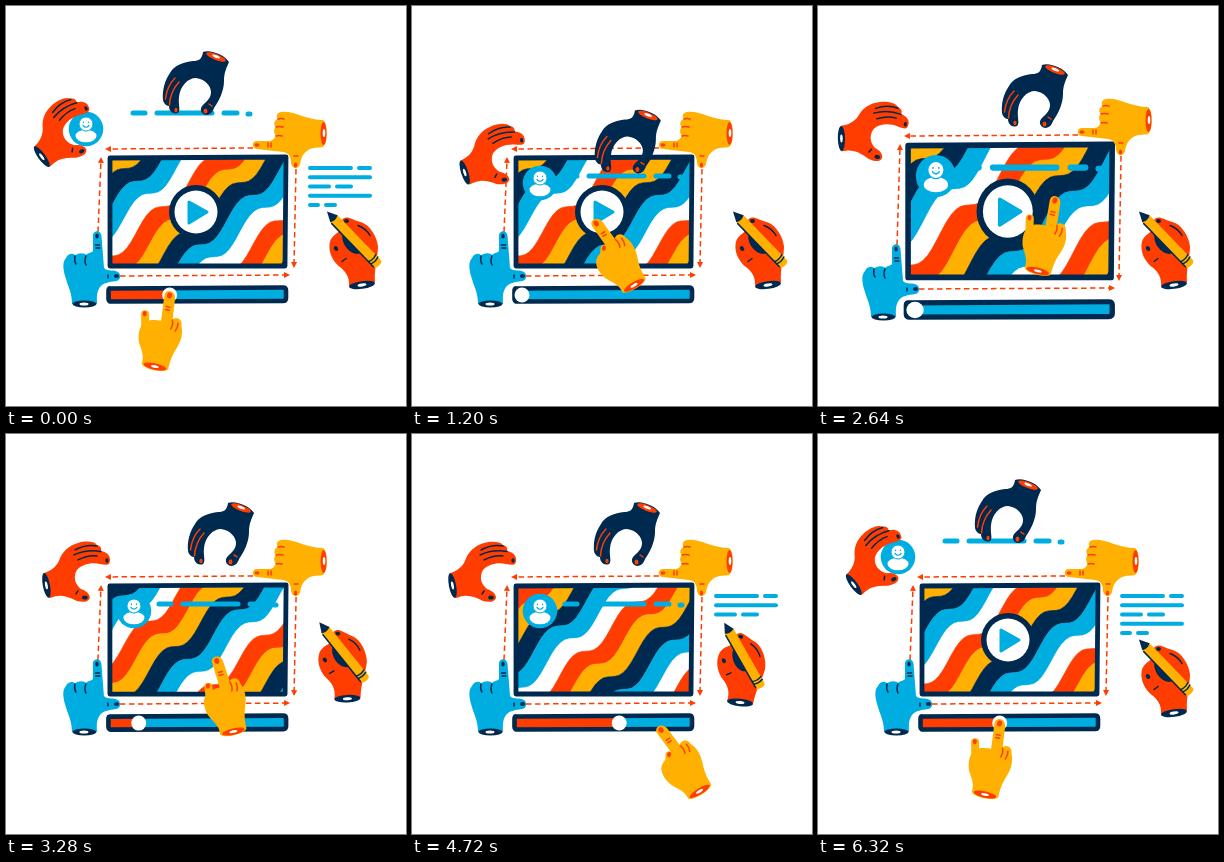
An HTML page for the animation above (6.4 s loop, 400x400 px).

```html
<!DOCTYPE html>
<html lang="en">
<head>
<meta charset="utf-8">
<title>Video player hands</title>
<style>
  html, body { margin: 0; width: 100%; height: 100%; overflow: hidden; background: #fff; }
  svg { display: block; width: 100vw; height: 100vh; }
  .n { fill: #00294f; } .r { fill: #ff3d00; } .y { fill: #ffb000; } .b { fill: #00ade0; } .w { fill: #fff; }
  .ln, .lr, .lb, .ly { fill: none; stroke-width: 1.5; stroke-linecap: round; stroke-linejoin: round; }
  .ln { stroke: #00294f; } .lr { stroke: #ff3d00; } .lb { stroke: #00ade0; } .ly { stroke: #ffb000; }
  .dash { fill: none; stroke: #ff3d00; stroke-width: 1.5; stroke-dasharray: 5.5 3.5; }
</style>
</head>
<body>
<svg viewBox="0 0 400 400" xmlns="http://www.w3.org/2000/svg">
  <defs>
    <clipPath id="inside"><path d="M105 152 L279 151 L278 260 L104 260 Z"/></clipPath>
    <marker id="head" markerUnits="userSpaceOnUse" markerWidth="8" markerHeight="8" refX="4" refY="4" orient="auto">
      <path class="r" d="M1 1 L7 4 L1 7 Z"/>
    </marker>
  </defs>
  <rect class="w" width="400" height="400"/>

  <g id="arrows"></g>

  <g id="screen">
    <g clip-path="url(#inside)"><g id="stripes"></g></g>
    <path class="ln" style="stroke-width:4.8" d="M104 152 L280 151 L279 260 L104 260 Z"/>
    <g id="play">
      <circle class="n" cx="190" cy="206" r="27"/>
      <circle class="w" cx="190" cy="206" r="21.5"/>
      <path class="b" stroke="#00ade0" stroke-width="3" stroke-linejoin="round" d="M183 196 L201 206 L183 217 Z"/>
    </g>
    <path id="title" class="lb" style="stroke-width:5" d="M153 170 H165 M177 170 H232 M244 170 H257 M268 171 H270"/>
    <g id="avatar">
      <circle class="b" cx="128" cy="177" r="17.3"/>
      <ellipse class="w" cx="128" cy="184" rx="10.5" ry="6.3"/>
      <circle class="w" cx="128" cy="172" r="7" stroke="#00ade0"/>
      <path class="lb" style="stroke-width:1.2" d="M125.500 170 v.6 M130.500 170 v.6 M125 173.500 Q128 177 131 173.500"/>
    </g>
  </g>

  <g id="seek">
    <rect class="b" x="102" y="281" width="178" height="15" rx="3"/>
    <rect id="fill" class="r" x="103" y="282" height="13.5"/>
    <path class="ln" style="stroke-width:4.6" d="M104 282.500 Q102.500 282 102.500 285 V293 Q102.500 296 106 295.500 L277 295 Q280 295 280 292 V284.500 Q280 281.500 277 281.500 Z"/>
    <circle id="knob" class="w" cy="289" r="7.5"/>
  </g>

  <g id="text" class="lb" style="stroke-width:4"></g>

  <g id="blueHand">
    <path class="b" d="M66 298 C66 286 62 281 60 273 C57 264 56 256 60 252 C62 247 68 247 69 249.500 C73 246 79 247 80 249 C83 246 86 247 87 245 L87 231 C86 224 95 223 95.500 230 L98 262 C102 266 108 263 112 266 C116 269 114 275 110 275 C103 276 97 277 94 281 C90 287 91 292 91 298 Z"/>
    <ellipse class="n" cx="78.500" cy="298" rx="12" ry="3.500"/>
    <ellipse class="w" cx="78" cy="298" rx="4.500" ry="1.500"/>
    <ellipse class="n" cx="91" cy="230" rx="1.700" ry="2.600"/>
    <ellipse class="n" cx="110.500" cy="270" rx="2.500" ry="1.900"/>
    <path class="ln" d="M69 250 Q68 255 70 258 M80 250 Q78 255 80 259 M89.500 239 h4 M90 242 h4 M102 269 v3"/>
  </g>

  <g id="cornerHand">
    <path class="y" d="M317 114 C309 114 303 112 296 110 C288 107 281 105 275 106 C270 107 270 111 272 113 C268 114 267 119 270 121 C267 123 268 128 270 130 C268 133 266 135 263 135 L251 135 C245 135 246 143 251 143 L277 146 C283 147 285 151 285 157 C286 164 293 163 294 158 C295 151 298 146 304 143 C309 141 313 142 317 141 C322 138 322 117 317 114 Z"/>
    <ellipse class="r" cx="317.500" cy="127.500" rx="3" ry="11.500"/>
    <ellipse class="w" cx="318" cy="127" rx="1.300" ry="4"/>
    <ellipse class="r" cx="251" cy="139" rx="2.500" ry="1.700"/>
    <ellipse class="r" cx="289.500" cy="159" rx="1.700" ry="2.500"/>
    <path class="lr" d="M272 113 Q275 112 278 113 M270 121 Q273 120 277 121 M270 130 Q273 129 276 130 M262 137 v4 M265 137 v4 M288 150 h4"/>
  </g>

  <g id="redHand">
    <path class="r" d="M38 139 C45 137 50 133 53 127 C56 118 62 112 72 109 C79 107 88 107 91 111 C95 112 96 115 95 117 C101 118 105 122 104 127 C104 132 99 131 94 130 C86 128 76 130 71 136 C67 143 69 150 75 155 C81 157 84 160 84 164 C82 169 76 168 71 167 C65 164 58 161 52 162 C48 162 46 164 43 164 Z"/>
    <g transform="rotate(-11 40.500 151.500)">
      <ellipse class="n" cx="40.500" cy="151.500" rx="3.600" ry="12.500"/>
      <ellipse class="w" cx="40.500" cy="151.500" rx="1.300" ry="4"/>
    </g>
    <path class="ln" d="M69 116 Q80 110 91 112 M68 121 Q81 115 95 117.500 M72 126 Q82 121 91 122 M70 160 l2 -3"/>
    <ellipse class="n" cx="79" cy="163.500" rx="2.800" ry="2"/>
    <ellipse class="n" cx="101" cy="126.500" rx="1.600" ry="2.300"/>
  </g>

  <g id="navyHand">
    <path class="n" d="M222 69 C221 76 218 78 212 78 C203 79 193 82 189 90 C184 97 181 107 182 117 C183 122 187 123 188 123 C188 128 192 132 197 130 C200 127 197 122 198 114 C199 103 207 95 215 95 C224 96 230 103 230 109 C230 115 226 118 222 122 C218 126 220 131 225 132 C230 132 232 128 233 125 C238 118 243 108 243 98 C243 90 245 86 248 79 C244 72 229 66 222 69 Z"/>
    <g transform="rotate(21 235 74)">
      <ellipse class="r" cx="235" cy="74" rx="10.500" ry="3"/>
      <ellipse class="w" cx="235" cy="73.500" rx="4" ry="1.300"/>
    </g>
    <path class="lr" d="M184.500 116 Q186 103 194 95 M188.500 122 Q189 109 198 99 M228 121 l3 2"/>
    <ellipse class="r" cx="224.500" cy="128" rx="2" ry="2.600"/>
    <ellipse class="r" cx="195" cy="127" rx="1.600" ry="2.300"/>
  </g>

  <g id="pencilHand">
    <path class="r" d="M343 280 C344 270 339 264 332 259 C325 252 322 243 324 235 C326 229 331 227 334 224 C333 216 336 210 342 211 C348 213 352 215 356 216 C364 219 371 230 372 240 C372 250 368 262 369 276 Z"/>
    <path class="n" d="M337 226 C345 223 356 231 358 242 C355 250 347 248 342 243 C337 238 335 231 337 226 Z"/>
    <g transform="rotate(-8 356 278.500)">
      <ellipse class="n" cx="356" cy="278.500" rx="13" ry="3.800"/>
      <ellipse class="w" cx="356" cy="278.500" rx="4.500" ry="1.500"/>
    </g>
    <g transform="translate(321 205) rotate(46)">
      <path class="y" d="M9 -5 H72 Q75 -5 75 0 Q75 5 72 5 H9 Z"/>
      <path class="n" d="M0 0 L10 -5 Q13 0 10 5 Z"/>
      <path class="ln" d="M12 5 H72 M65 -5 Q67 0 65 5 M68 -5 Q70 0 68 5"/>
    </g>
    <path class="r" d="M325 238 C329 236 333 240 337 244 C341 249 337 253 332 251 C326 249 322 243 325 238 Z"/>
    <ellipse class="n" cx="330" cy="242" rx="2" ry="2.600" transform="rotate(-40 330 242)"/>
    <ellipse class="n" cx="340.500" cy="214.500" rx="2.500" ry="1.900"/>
    <path class="ln" d="M352 219 Q360 222 364 229 M336 255 l4 -3"/>
  </g>

  <g id="pointer">
    <path class="y" d="M-5 2 C-6 -6 5 -6 6 2 L8 23 C12 19 18 22 18 28 C21 34 21 42 18 50 C15 58 14 64 14 73 C12 78 -11 78 -13 73 C-12 65 -16 60 -20 53 C-23 45 -23 37 -19 32 C-15 28 -8 27 -3 27 Z"/>
    <g id="thumb">
      <path class="ly" style="stroke-width:8" d="M-20 24 L-16 42"/>
      <ellipse class="r" cx="-20.500" cy="23.500" rx="2" ry="2.600"/>
    </g>
    <ellipse class="r" cx=".5" cy="73" rx="11.500" ry="3.200"/>
    <ellipse class="w" cx=".5" cy="73" rx="4" ry="1.300"/>
    <ellipse class="r" cy=".5" rx="2.500" ry="3"/>
    <path class="lr" d="M8 24 Q10 29 8 33 M14 26 Q15 30 13 34 M-1 12 h4 M-1 15 h4"/>
  </g>
</svg>

<script>
const LOOP = 6400;
const PLAY_ON = 2840, GRAB = 5800;
const $ = id => document.getElementById(id);
const put = (id, tf) => $(id).setAttribute('transform', tf);
const clamp = v => Math.min(1, Math.max(0, v));
const line = (t, a, b) => clamp((t - a) / (b - a));
const ramp = (t, a, b) => { const u = line(t, a, b); return u * u * (3 - 2 * u); };
const mix = (p, q, u) => p.map((v, i) => v + (q[i] - v) * u);
// Eases from one pose to the next; each step is [begin, end, pose].
const walk = (t, pose, ...steps) => steps.reduce((p, [a, b, q]) => mix(p, q, ramp(t, a, b)), pose);

function add(parent, tag, attrs) {
  const el = document.createElementNS('http://www.w3.org/2000/svg', tag);
  for (const k in attrs) el.setAttribute(k, attrs[k]);
  parent.appendChild(el);
  return el;
}

// Diagonal wavy bands: one curve, shifted for each colour.
const STEP = 12.7, BANDS = 21;
const inks = ['#00ade0', '#fff', '#ff3d00', '#ffb000', '#00294f'];
function edge(i) {
  const pts = [];
  for (let x = -220; x <= 380; x += 4) {
    const y = 7.5 * Math.sin(x * Math.PI / 26) - 0.95 * x;
    pts.push(`${(105 + x + i * STEP).toFixed(1)} ${(250 + y + i * STEP).toFixed(1)}`);
  }
  return pts;
}
for (let i = 0; i < BANDS; i++) {
  const ink = inks[i % 5];
  add($('stripes'), 'path', {
    d: 'M' + edge(i - 7).concat(edge(i - 6).reverse()).join('L') + 'Z',
    fill: ink, stroke: ink, 'stroke-width': 0.6
  });
}

const arrows = [0, 1, 2, 3].map(() => add($('arrows'), 'path', { class: 'dash', 'marker-end': 'url(#head)' }));

// Handwritten rows: width and, if broken, where the gap begins.
const LEFT = 302, TOP = 162, LEAD = 9.25, WRITE = 3450, BEAT = 440;
const rows = [[64, 45], [64], [45, 23], [64], [29, 12]].map(([w, gap]) => ({ w, gap, el: add($('text'), 'path', {}) }));
const written = (t, i) => ramp((t - WRITE) / BEAT - i, 0, 0.64);

function drawText(t) {
  const left = 5 * (1 - line(t, 80, 700));
  rows.forEach(({ w, gap, el }, i) => {
    const to = w * (t < 1500 ? clamp(left - i) : written(t, i)) - 2;
    const dash = (a, b) => b > a ? `M${LEFT + a} ${TOP + i * LEAD}H${LEFT + b}` : '';
    el.setAttribute('d', gap ? dash(2, Math.min(to, gap - 2)) + dash(gap + 6, to) : dash(2, to));
  });
}

function pencilPose(t) {
  const beat = (t - WRITE) / BEAT, i = Math.min(4, Math.max(0, Math.floor(beat)));
  const back = i < 4 ? ramp(beat - i, 0.64, 1) : 0;
  const x = rows[i].w * written(t, i) * (1 - back);
  const on = [LEFT + x, TOP + 1 + LEAD * (i + back), 13 + x / 8];
  return mix([321, 205.5, 0], on, ramp(t, 3150, WRITE) - ramp(t, 5480, 5800));
}

// A hand sets its load on the screen, rests, then fetches it again.
function carry(t, aloft, drop, lift) {
  const p = walk(t, aloft, [620, 960, drop], [980, 1320, [0, 0, 0]], [5160, 5580, drop], [5720, 6180, aloft]);
  const up = ramp(t, 0, 420) - ramp(t, 620, 960) + 0.5 * (ramp(t, 4800, 5160) - ramp(t, 5160, 5400));
  return { pose: p.map((v, i) => v + lift[i] * up), held: t < 970 || t > 5650 };
}

const dragX = t => 263 - 153 * ramp(t < 3000 ? t + LOOP : t, GRAB, 6800);

function pointerPose(t) {
  const grip = [dragX(t), 289, 12];
  return walk(t, grip,
    [640, 1200, [184, 217, -31]], [1200, 2600, [237, 194, 14]], [2640, PLAY_ON, [200, 210, 0]],
    [2950, 3700, [226, 250, -31]], [3700, 5200, [256, 310, -32]], [5480, GRAB, grip]);
}

function drawFrame(k) {
  const e = 13 * k, sx = 1 + 0.16 * k;
  put('screen', `translate(191 ${206 - k / 2}) scale(${sx} ${1 + 0.22 * k}) translate(-191 -206)`);
  put('seek', `translate(191 ${289 + 15 * k}) scale(${sx} ${1 + 0.1 * k}) translate(-191 -289)`);
  put('blueHand', `translate(${-e} ${e})`);
  put('cornerHand', `translate(${e} ${-e})`);
  const l = 93 - e, r = 289 + e, top = 142 - e, low = 270 + e;
  [`M${l - 1} ${low - 44}L${l + 2} ${top + 12}`, `M${r - 42} ${top}L${l + 9} ${top + 1}`,
   `M${r + 1} ${top + 21}L${r - 1} ${low - 11}`, `M${l + 21} ${low}L${r - 8} ${low - 1}`]
    .forEach((d, i) => arrows[i].setAttribute('d', d));
}

function draw(t) {
  const k = ramp(t, 1900, 2400) - ramp(t, 2880, 3300);
  drawFrame(k);

  const roll = -5 * STEP * line(t, 2700, 5440);
  put('stripes', `translate(${roll} ${roll})`);
  const pop = 1 - line(t, PLAY_ON, PLAY_ON + 120) + line(t, GRAB, GRAB + 120);
  put('play', `translate(190 206) scale(${pop}) translate(-190 -206)`);

  const red = carry(t, [-5, -1, -25], [43, 53, -25], [-9, -4, 0]);
  const navy = carry(t - 150, [-25, -23, 0], [1, 40, 0], [0, -13, 0]);
  const [rx, ry, ra] = red.pose, [nx, ny] = navy.pose;
  put('redHand', `translate(${rx - 17 * k} ${ry - 19 * k}) rotate(${ra + 10 * k} 41 151)`);
  put('navyHand', `translate(${nx + 2 * k} ${ny - 10 * k})`);
  put('avatar', red.held ? `translate(${rx - 43} ${ry - 53})` : '');
  put('title', navy.held ? `translate(${nx - 1} ${ny - 40})` : '');

  const [px, py, pa] = pointerPose(t);
  put('pointer', `translate(${px} ${py}) rotate(${pa})`);
  put('thumb', `rotate(${45 * clamp(-pa / 30)} -16 42)`);
  const x = t < PLAY_ON || t > GRAB ? dragX(t) : 110 + 153 * line(t, PLAY_ON, GRAB);
  $('knob').setAttribute('cx', x);
  $('fill').setAttribute('width', x - 103);

  const [qx, qy, qa] = pencilPose(t);
  put('pencilHand', `translate(${qx - 321} ${qy - 205}) rotate(${qa} 321 205)`);
  drawText(t);
}

const start = performance.now();
function tick() {
  draw((performance.now() - start) % LOOP);
  requestAnimationFrame(tick);
}
tick();
</script>
</body>
</html>
```
